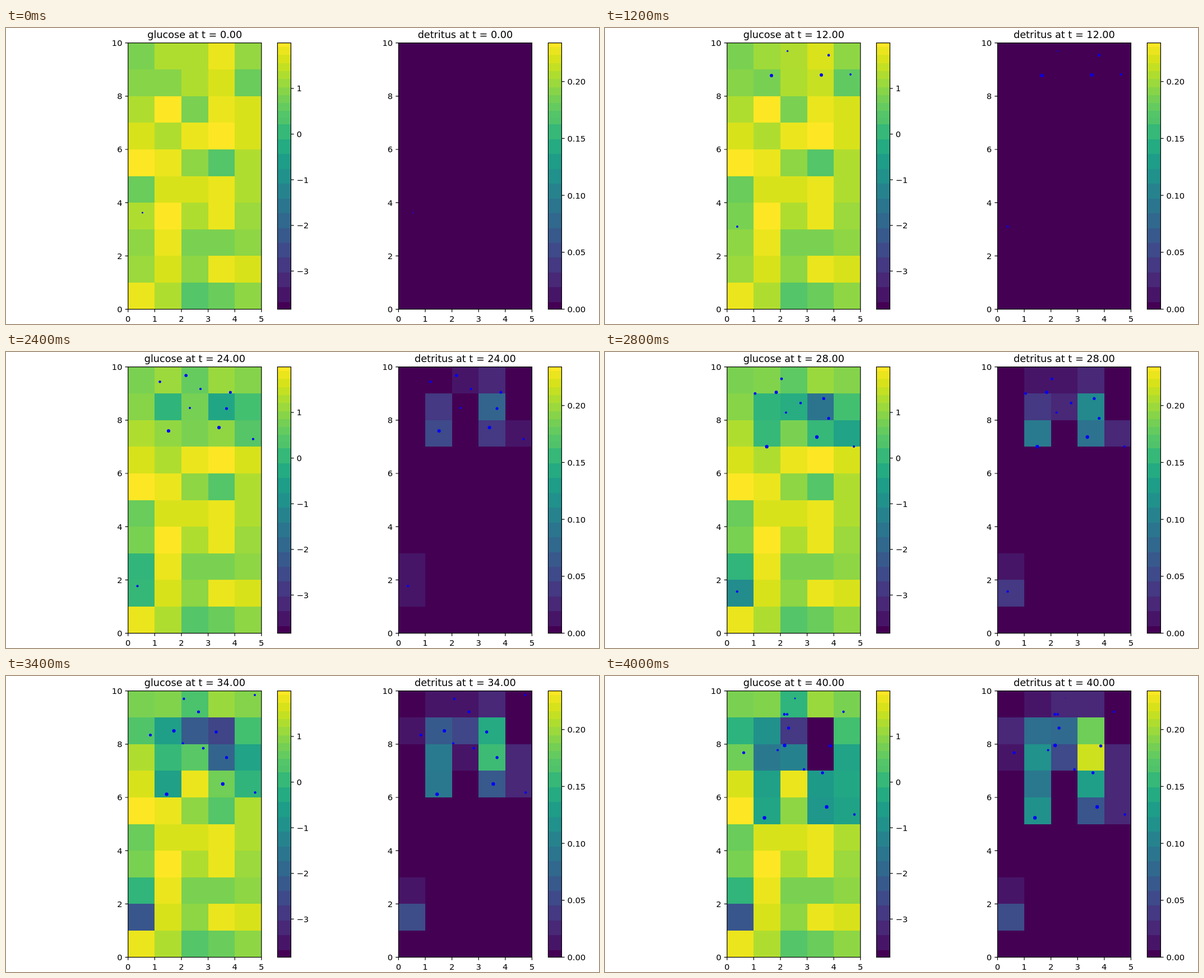
Write an HTML page that moves like this. It is 1058 px wide and 529 px high and loops after 4100 ms.

```html
<!DOCTYPE html>
<html lang="en">
<head>
<meta charset="utf-8">
<title>Glucose and detritus</title>
<style>
html, body { margin: 0; width: 100%; height: 100%; overflow: hidden; background: #fff; }
svg { display: block; width: 100%; height: 100%; }
text { font: 14.7px "DejaVu Sans", sans-serif; fill: #000; }
.title { font-size: 17.65px; text-anchor: middle; }
.end { text-anchor: end; }
.mid { text-anchor: middle; }
.crisp { shape-rendering: crispEdges; }
.line { fill: none; stroke: #000; stroke-width: 1.2; }
</style>
</head>
<body>
<svg id="stage" viewBox="0 0 1058 529"></svg>
<script>
const STEP = 100, STEPS = 41;
const COLS = 5, ROWS = 10, CELL = 47.6;
const TOP = 26.6, W = COLS * CELL, H = ROWS * CELL, BOTTOM = TOP + H;
const BAR = 24, TICK = 5.2;
const VIRIDIS = ('440154 471365 482475 463480 414487 3b528b 355f8d 2f6c8e 2a788e 25848e 21918c ' +
  '1e9c89 22a884 2fb47c 44bf70 5ec962 7ad151 9bd93c bddf26 dfe318 fde725').split(' ')
  .map(h => [0, 2, 4].map(i => parseInt(h.substr(i, 2), 16)));

// Starting glucose, bottom row first, in percent of the colour scale
const START = [
  [97, 88, 73, 77, 83],
  [85, 94, 83, 97, 94],
  [83, 97, 80, 80, 83],
  [88, 100, 88, 97, 85],
  [77, 94, 94, 97, 88],
  [100, 97, 83, 73, 88],
  [94, 88, 97, 100, 94],
  [88, 100, 80, 97, 94],
  [82, 82, 88, 94, 77],
  [80, 88, 88, 97, 84]
].flat();

const stage = document.getElementById('stage');
const clamp = (v, lo, hi) => Math.max(lo, Math.min(hi, v));

function add(parent, tag, attrs, text) {
  const el = document.createElementNS('http://www.w3.org/2000/svg', tag);
  for (const k in attrs) el.setAttribute(k, attrs[k]);
  if (text !== undefined) el.textContent = text;
  parent.appendChild(el);
  return el;
}

function colour(v) {
  const p = clamp(v, 0, 100) / 5;
  const i = Math.min(19, Math.floor(p)), f = p - i;
  return `rgb(${VIRIDIS[i].map((a, k) => Math.round(a + (VIRIDIS[i + 1][k] - a) * f))})`;
}

// The colour scale shows in bands, finer towards yellow
function band(v) {
  return v > 72 ? 100 - 3 * Math.round((100 - v) / 3) : Math.round(v * 0.18) / 0.18;
}

function makePanel(name, x, barX, first, stepY, labels) {
  const squares = add(stage, 'g', { class: 'crisp' });
  const clip = add(stage, 'clipPath', { id: name });
  add(clip, 'rect', { x, y: TOP, width: W, height: H });

  const cells = START.map((_, i) => add(squares, 'rect', {
    x: x + i % COLS * CELL, y: BOTTOM - (Math.floor(i / COLS) + 1) * CELL,
    width: CELL, height: CELL
  }));
  for (let i = 0; i < H; i++) {
    add(squares, 'rect', {
      x: barX, y: TOP + i, width: BAR, height: 1.5,
      fill: colour(band(100 - (i + 0.5) / H * 100))
    });
  }
  const dots = add(stage, 'g', { 'clip-path': `url(#${name})`, fill: '#00f' });

  const lines = add(stage, 'g', { class: 'line' });
  add(lines, 'rect', { x, y: TOP, width: W, height: H });
  add(lines, 'rect', { x: barX, y: TOP, width: BAR, height: H });
  for (let i = 0; i <= 5; i++) {
    const tx = x + i * CELL, ty = BOTTOM - i * 2 * CELL;
    add(lines, 'path', { d: `M${tx} ${BOTTOM}v${TICK}M${x} ${ty}h${-TICK}` });
    add(stage, 'text', { class: 'mid', x: tx, y: 525.3 }, i);
    add(stage, 'text', { class: 'end', x: x - 10.3, y: ty + 5.4 }, i * 2);
  }
  labels.forEach((label, i) => {
    const ty = first + i * stepY;
    add(lines, 'path', { d: `M${barX + BAR} ${ty}h${TICK}` });
    add(stage, 'text', { x: barX + 34, y: ty + 5.4 }, label);
  });
  const title = add(stage, 'text', { class: 'title', x: x + W / 2, y: 17.6 });
  return { name, x, cells, dots, title };
}

const panels = [
  makePanel('glucose', 217.8, 484.4, 108, 81.6, ['1', '0', '−1', '−2', '−3']),
  makePanel('detritus', 700.4, 967.4, 95.7, 101.7, ['0.20', '0.15', '0.10', '0.05', '0.00'])
];
const LEFT = panels[0].x;

// A particle of full radius r drifts through points of time, x, y
const particles = [];
function particle(r, ...path) {
  const points = [];
  while (path.length) points.push(path.splice(0, 3));
  particles.push({
    r, points, born: points[0][0], dies: points[points.length - 1][0],
    circles: panels.map(p => add(p.dots, 'circle', {}))
  });
}

particle(2.2, 0, 243.5, 330, 12, 236, 355, 19, 233, 406, 32, 237, 438);
particle(3.2, 2, 301, 27, 12, 297, 85, 24, 290, 141, 40, 284.5, 253.5);
particle(3.2, 2, 379, 27, 12, 386, 84, 28, 378, 152, 40, 395.5, 234);
particle(2.7, 7, 408, 27, 19, 386.5, 79, 28, 399, 118.5, 40, 388, 173);
particle(2.2, 4, 444, 27, 12, 438, 83, 19, 437, 139, 28, 444, 169, 40, 445, 247.5);
particle(2.1, 8, 328, 27, 19, 321.5, 66, 24, 328, 100, 40, 308, 132.5);
particle(2.8, 13, 408, 27, 19, 413, 58, 34, 375, 100, 40, 402, 125);
particle(2.4, 15, 368, 27, 24, 347, 66, 40, 355, 167);
particle(2.7, 19, 283, 27, 40, 247.5, 137);
particle(3.3, 22, 329, 27, 28, 305.5, 72, 34, 299.5, 98, 40, 320.5, 124);
particle(2.9, 25, 317, 27, 28, 315, 48, 34, 343.5, 64, 40, 327.5, 93);
particle(2.7, 31, 316, 27, 40, 320, 68.5);
particle(2.5, 33, 447, 29, 40, 425.5, 64);
particle(2.7, 36, 329, 27, 40, 325, 68.5);
particle(1.9, 38, 341, 28, 40, 339, 40);

const alive = (p, t) => t >= p.born && t <= p.dies;
const radius = (p, t) => p.r - 0.6 * Math.exp((p.born - t) / 12);

function place(p, t) {
  const i = Math.max(1, p.points.findIndex(k => k[0] >= t));
  const [t0, x0, y0] = p.points[i - 1], [t1, x1, y1] = p.points[i];
  const f = (t - t0) / (t1 - t0);
  return [x0 + (x1 - x0) * f, y0 + (y1 - y0) * f];
}

// Particles eat faster with age; bigger ones leave more detritus behind
function simulate() {
  const glucose = START.slice(), detritus = START.map(() => 0), states = [];
  for (let t = 0; t < STEPS; t++) {
    for (const p of particles) {
      if (!alive(p, t)) continue;
      const [x, y] = place(p, t);
      const col = clamp(Math.floor((x - LEFT) / CELL), 0, COLS - 1);
      const row = clamp(Math.floor((BOTTOM - y) / CELL), 0, ROWS - 1);
      const i = row * COLS + col;
      const eaten = 0.2 * Math.max(0, t - p.born - 3.5);
      glucose[i] = Math.max(0, glucose[i] - eaten);
      detritus[i] = Math.min(100, detritus[i] + eaten * (radius(p, t) / 2.9) ** 3);
    }
    states.push([glucose.slice(), detritus.slice()]);
  }
  return states;
}
const states = simulate();

function draw(t) {
  panels.forEach((panel, k) => {
    panel.title.textContent = `${panel.name} at t = ${t.toFixed(2)}`;
    panel.cells.forEach((cell, i) => {
      const v = states[t][k][i];
      cell.setAttribute('fill', colour(v < 20 ? band(v) : v));
    });
    for (const p of particles) {
      const el = p.circles[k];
      el.style.display = alive(p, t) ? '' : 'none';
      if (!alive(p, t)) continue;
      const [x, y] = place(p, t), r = radius(p, t);
      el.setAttribute('cx', x + panel.x - LEFT);
      el.setAttribute('cy', y);
      el.setAttribute('r', r);
      el.setAttribute('opacity', k ? clamp((r - 1.3) / 0.6, 0.2, 1) : 1);
    }
  });
}

const began = performance.now();
let shown = -1;
function tick() {
  const t = Math.floor((performance.now() - began) / STEP) % STEPS;
  if (t !== shown) draw(shown = t);
  requestAnimationFrame(tick);
}
tick();
</script>
</body>
</html>
```
